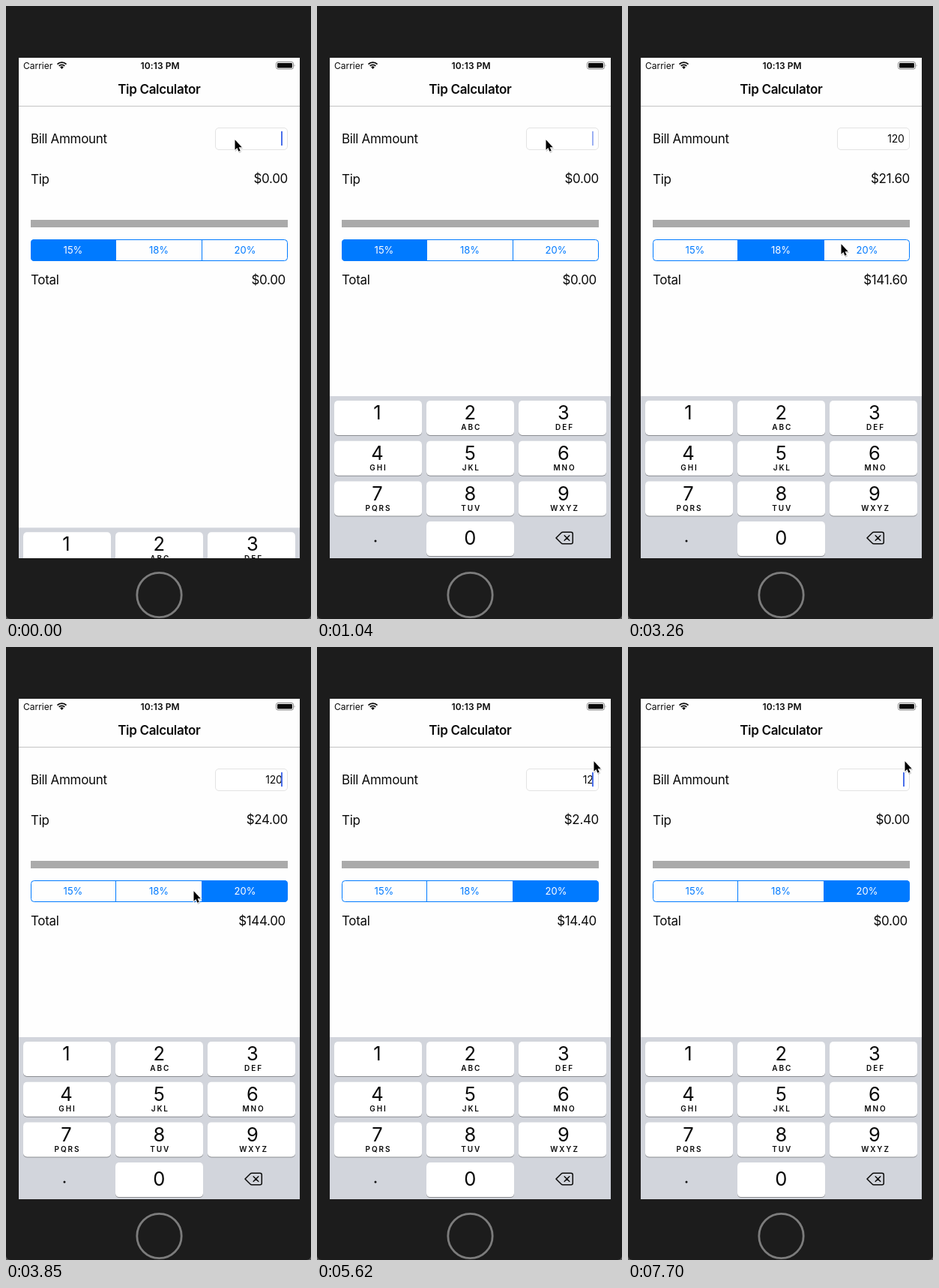
These frames come from a looping animation (407 by 817 pixels, 8000 ms). An HTML page:

```html
<!DOCTYPE html>
<html lang="en">
<head>
<meta charset="utf-8">
<title>Tip Calculator</title>
<style>
  html, body { margin: 0; width: 100%; height: 100%; overflow: hidden; background: #555; }
  svg { display: block; font-family: Inter, Roboto, sans-serif; fill: #0a0a0a; }
  .body { font-size: 17px; letter-spacing: -.33px; }
  .amount { text-anchor: end; }
  .mid { text-anchor: middle; }
  .blue { fill: #007aff; }
  .digit { font-size: 25.5px; text-anchor: middle; }
  .letters { font-size: 10px; font-weight: 600; letter-spacing: 1.9px; text-anchor: middle; }
  .line { fill: none; stroke: #0a0a0a; }
</style>
</head>
<body>
<svg width="407" height="817" viewBox="0 0 407 817">
  <defs>
    <clipPath id="screen"><rect x="17" y="69" width="375" height="667"/></clipPath>
    <clipPath id="pill"><rect x="33" y="311" width="343" height="29" rx="4.5"/></clipPath>
  </defs>
  <rect y="-10" width="407" height="827" rx="6" fill="#1c1c1c"/>
  <circle cx="204.5" cy="785" r="29.7" fill="none" stroke="#7c7c7c" stroke-width="2.8"/>
  <rect x="17" y="69" width="375" height="667" fill="#fefefe"/>

  <text x="23" y="83.5" font-size="12">Carrier</text>
  <g transform="translate(74.5 84)">
    <path d="M0 0L-2.3-2.6A3.3 3.3 0 0 1 2.3-2.6Z"/>
    <path class="line" stroke-width="1.9" d="M-3.8-4.1A5.4 5.4 0 0 1 3.8-4.1M-6-6.4A8.6 8.6 0 0 1 6-6.4"/>
  </g>
  <text class="mid" x="205.7" y="83.5" font-size="12" font-weight="600" letter-spacing=".1">10:13 PM</text>
  <rect x="360.5" y="74.5" width="23" height="9.5" rx="2.5" fill="none" stroke="#8a8a8a"/>
  <rect x="362" y="76" width="20" height="6.5" rx="1.2"/>
  <path d="M384.7 77.5Q386.5 79.2 384.7 81Z" fill="#8a8a8a"/>

  <text class="body mid" x="204.3" y="117" font-weight="600">Tip Calculator</text>
  <rect x="17" y="133" width="375" height="1" fill="#c4c4c4"/>

  <g class="body">
    <text x="33" y="183">Bill Ammount</text>
    <text x="33" y="237">Tip</text>
    <text x="33" y="371">Total</text>
    <text class="amount" id="tip" x="376" y="236"></text>
    <text class="amount" id="total" x="373" y="371"></text>
  </g>
  <rect x="279.5" y="162.5" width="96" height="29" rx="4.5" fill="#fff" stroke="#e3e3e3"/>
  <text class="amount" id="bill" x="368.5" y="182" font-size="14" letter-spacing="-.3"></text>
  <rect id="caret" x="367" y="167" width="2" height="19" fill="#4a6fea"/>
  <rect x="33" y="285" width="343" height="10" fill="#aaa"/>

  <g id="segments" font-size="13" clip-path="url(#pill)"></g>
  <path d="M146.5 311V340M261.5 311V340" stroke="#007aff"/>
  <rect x="33.5" y="311.5" width="342" height="28" rx="4" fill="none" stroke="#007aff"/>

  <g clip-path="url(#screen)">
    <g id="keyboard">
      <rect x="17" y="520" width="375" height="217" fill="#d2d5dc"/>
      <g id="keys"></g>
      <circle cx="78" cy="713" r="1.5"/>
      <path class="line" stroke-width="1.5" stroke-linejoin="round" stroke-linecap="round"
        d="M319 709L325.8 702.2Q326.8 701.2 328 701.2H339Q341.3 701.2 341.3 703.5V714.5Q341.3 716.8 339 716.8H328Q326.8 716.8 325.8 715.8ZM330.2 705.7L336.8 712.3M336.8 705.7L330.2 712.3"/>
    </g>
  </g>

  <g id="pointer">
    <path d="M1 2V15.5L4 12.7 6 17.5 8.7 16.3 6.5 11.7H10.5Z" fill="#000" opacity=".2" stroke="#000"/>
    <path d="M.5.3V13.8L3.4 11 5.4 15.8 7.7 14.8 5.6 10.2H9.8Z" fill="#000" stroke="#fff" stroke-width="1.6" paint-order="stroke"/>
  </g>
</svg>
<script>
const $ = id => document.getElementById(id);
const LOOP = 8000, TICK = 148; // the screen refreshes once per tick

// [tick, value] lists hold each value until the next entry
const BILL = [[0, ''], [8, '1'], [9, '12'], [10, '120'], [38, '12'], [39, '1'], [40, ''], [45, '0'], [52, '']];
const SELECTED = [[0, 0], [20, 1], [25, 2]];
const PRESSED = [[0, -1], [19, 1], [20, -1], [24, 2], [25, -1], [28, 0], [29, -1]];
const POINTER = [
  [13, 305, 178], [14, 297, 195], [15, 262, 265], [16, 226, 345], [17, 213, 363], [18, 211, 368],
  [19, 206, 335], [20, 206, 332], [21, 222, 325], [22, 284, 317], [23, 312, 321], [25, 316, 323],
  [26, 250, 325], [27, 165, 328], [28, 118, 329], [30, 111, 333], [31, 150, 318], [32, 240, 260],
  [33, 325, 190], [34, 371, 149], [35, 369, 152]
];
const RATES = [15, 18, 20];
const EDGES = [33, 146.5, 261.5, 376];
const LETTERS = ['', 'ABC', 'DEF', 'GHI', 'JKL', 'MNO', 'PQRS', 'TUV', 'WXYZ'];

const latest = (list, tick) => list.filter(([at]) => at <= tick).pop();

function pointerAt(tick) {
  const from = latest(POINTER, tick) || POINTER[0];
  const to = POINTER.find(([at]) => at > tick);
  if (!to || from[0] > tick) return [from[1], from[2]];
  const k = (tick - from[0]) / (to[0] - from[0]);
  return [1, 2].map(i => from[i] + (to[i] - from[i]) * k);
}

// Solid after a keystroke, then blinking once per second
function caretAlpha(tick) {
  const [keyTick] = latest(BILL, tick);
  const since = (tick - keyTick) * TICK + (keyTick ? 0 : 25);
  const phase = since % 1000;
  const rise = since < 1000 ? 1 : Math.min(1, phase / 110);
  const fall = Math.max(0, Math.min(1, (700 - phase) / 150));
  return Math.min(rise, fall);
}

// Critically damped spring, already under way when the loop starts
function keyboardOffset(tick) {
  const x = .018 * (tick * TICK + 44);
  return 216 * (1 + x) * Math.exp(-x);
}

function buildKey(n) {
  const i = n ? n - 1 : 10, col = i % 3, row = Math.floor(i / 3);
  const x = 23 + col * 123, y = 526 + row * 53.7, mid = [80.5, 204.3, 329][col];
  const box = (dy, fill) => `<rect x="${x}" y="${y + dy}" width="117" height="46" rx="5" fill="${fill}"/>`;
  return box(1, '#8b8d92') + box(0, '#fff') +
    `<text class="digit" x="${mid}" y="${n ? 551 + row * 54 : 718}">${n}</text>` +
    (n ? `<text class="letters" x="${mid + 1.5}" y="${565 + row * 54}">${LETTERS[i]}</text>` : '');
}

$('keys').innerHTML = [1, 2, 3, 4, 5, 6, 7, 8, 9, 0].map(buildKey).join('');
$('segments').innerHTML = RATES.map((rate, i) =>
  `<rect class="blue" x="${EDGES[i]}" y="311" width="${EDGES[i + 1] - EDGES[i]}" height="29"/>` +
  `<text class="mid" x="${[89.5, 204, 319][i]}" y="330">${rate}%</text>`).join('');
const fills = [...$('segments').querySelectorAll('rect')];
const labels = [...$('segments').querySelectorAll('text')];

function render(time) {
  const tick = Math.floor((time % LOOP + 12) / TICK);
  const bill = latest(BILL, tick)[1];
  const selected = latest(SELECTED, tick)[1];
  const pressed = latest(PRESSED, tick)[1];
  const tip = Number(bill) * RATES[selected] / 100;

  $('bill').textContent = bill;
  $('tip').textContent = '$' + tip.toFixed(2);
  $('total').textContent = '$' + (Number(bill) + tip).toFixed(2);
  $('caret').setAttribute('opacity', caretAlpha(tick));
  fills.forEach((rect, i) => rect.setAttribute('opacity', i === selected ? 1 : i === pressed ? .15 : 0));
  labels.forEach((label, i) => label.setAttribute('fill', i === selected ? '#fff' : '#007aff'));
  $('keyboard').setAttribute('transform', `translate(0 ${keyboardOffset(tick)})`);
  $('pointer').setAttribute('transform', `translate(${pointerAt(tick)})`);
}

const start = performance.now();
function frame() {
  render(performance.now() - start);
  requestAnimationFrame(frame);
}
frame();
</script>
</body>
</html>
```
